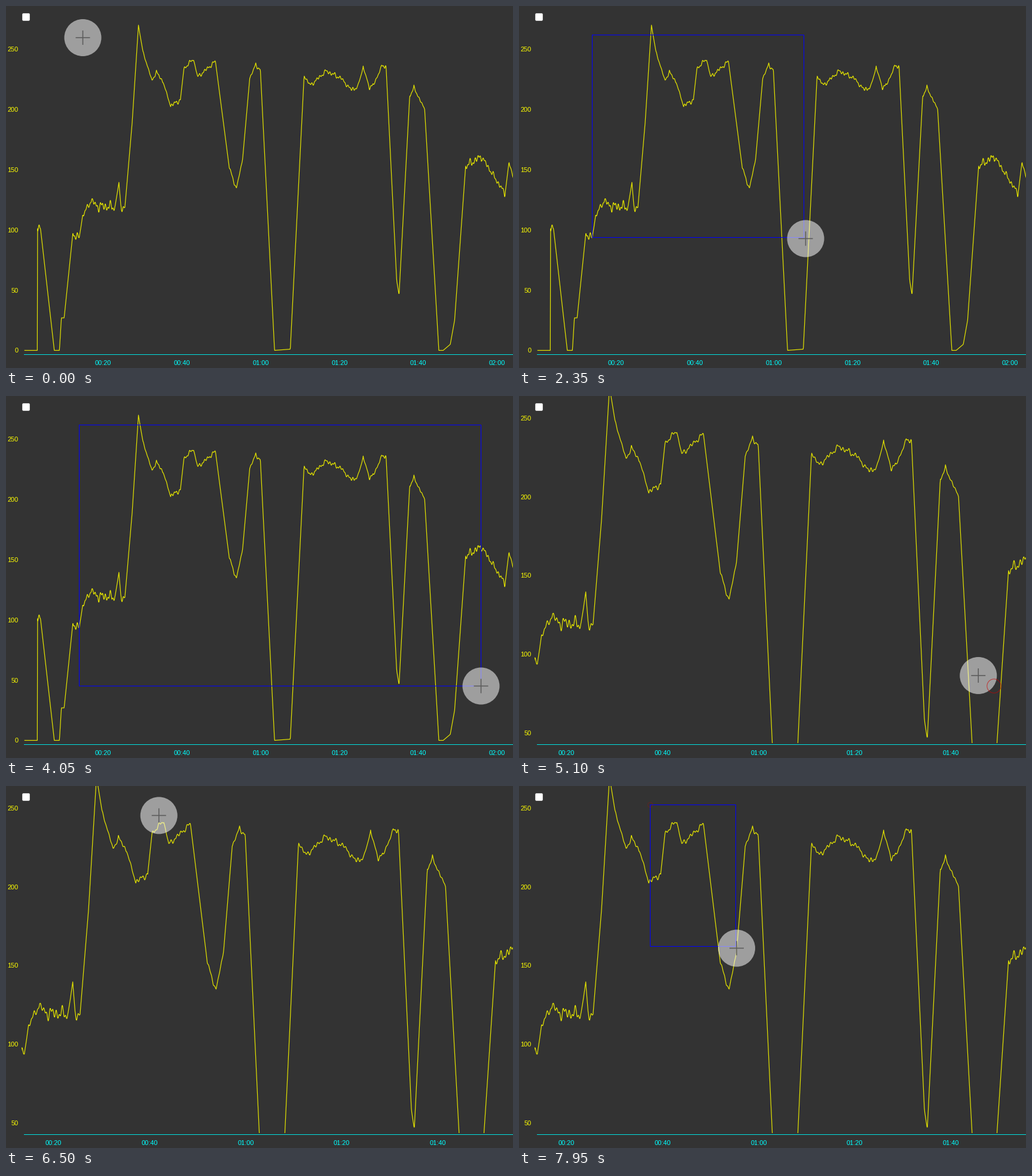
A matplotlib script for the animation above (8000 ms loop, 848x606 px).

```python
import numpy as np
import matplotlib.pyplot as plt
from matplotlib.animation import FuncAnimation
from matplotlib.patches import Circle, FancyBboxPatch, Rectangle

W, H, DPI = 848, 606, 100
STEP, LOOP = 50, 8000
PX = 72 / DPI                      # one pixel in points

BG, YELLOW, CYAN, BLUE = "#333333", "#ffff00", "#00ffff", "#0000ff"
plt.rcParams["path.snap"] = False

# Turning points of the signal: seconds, value
TURNS = np.array([
    (0, 0), (3.3, 0), (3.32, 101), (4.1, 101), (7.6, 0), (8.9, 0),
    (9.4, 27), (10.1, 27), (12.3, 97), (13.9, 93), (14.8, 112), (17.1, 125),
    (18.2, 120), (23, 119), (24, 139), (24.5, 120), (25.5, 118),
    (27.3, 186), (28.95, 270), (30.1, 248), (32.4, 224), (33.5, 231),
    (35.2, 223), (37.1, 203), (39.6, 208), (40.5, 234), (42.9, 242),
    (44, 227), (48.5, 240), (52, 152), (53.8, 134), (55.4, 159),
    (57.2, 226), (58.7, 237), (59.9, 233), (63.5, 0), (67.5, 1),
    (71, 228), (72.6, 220), (76.6, 232), (80.4, 226), (82.7, 217),
    (84.5, 218), (86, 235), (87.5, 219), (88.6, 220), (90.7, 236),
    (91.8, 236), (94.5, 58), (95.1, 46), (97.8, 211), (98.9, 218),
    (101.6, 200), (105.2, 0), (106.3, 0), (108.1, 5), (109.2, 25),
    (112, 153), (116, 161), (122, 130), (123, 156), (124.3, 141),
])


def make_signal():
    """Turning points joined by lines, with a ripple on the level parts."""
    t = np.arange(0, 124.4, 0.08)
    base = np.interp(t, *TURNS.T)
    ripple = sum(np.sin(t * f + f) for f in (3.1, 5.3, 9.7)) / 3
    slope = np.abs(np.gradient(base, t))
    rough = np.where(base < 180, 5.5, 3) * np.exp(-slope / 9)
    return t, base + ripple * rough * (base > 85)


seconds, values = make_signal()

# x of 00:00, px per second, y of zero, px per unit
OVERVIEW = (30.7, 6.59, 576.5, 2.016)
ZOOMED = (-81.2, 8.035, 695.3, 2.633)

# Pointer path: ms, x, y
PATH = np.array([
    (0, 128.5, 53), (900, 128.5, 53), (1100, 122.5, 48.5),
    (1500, 122.5, 48.5), (1850, 229.5, 182.5), (2250, 433, 364),
    (2850, 683.5, 473.5), (3200, 759, 485.5), (3900, 759, 485.5),
    (4050, 794.5, 485.5), (5000, 794.5, 485.5), (5850, 108.5, 27.5),
    (6050, 111.5, 29), (6450, 257, 50), (6900, 219.5, 31.5),
    (7200, 219.5, 31.5), (7350, 219.5, 47.5), (7950, 364, 271.5),
])
TIMES, SPOTS = PATH[:, 0], PATH[:, 1:]

# Press and release times of the two selections
PRESS, RELEASE, PRESS_AGAIN = 1500, 4700, 7200
DRAGS = [(PRESS, RELEASE), (PRESS_AGAIN, LOOP)]
RING_MS = 800


def tangents():
    """Monotone tangents: zero at holds and turns."""
    d = np.diff(SPOTS, axis=0) / np.diff(TIMES)[:, None]
    a, b = d[:-1], d[1:]
    same = a * b > 0
    mid = np.where(same, 2 * a * b / np.where(same, a + b, 1), 0)
    return np.vstack([[0, 0], mid, d[-1]])


SPEEDS = tangents()


def pointer(t):
    i = min(np.searchsorted(TIMES, t, side="right"), len(TIMES) - 1) - 1
    h = TIMES[i + 1] - TIMES[i]
    u = (t - TIMES[i]) / h
    ease = u * u * (3 - 2 * u)
    return (SPOTS[i] * (1 - ease) + SPOTS[i + 1] * ease
            + h * u * (1 - u) * (SPEEDS[i] * (1 - u) - SPEEDS[i + 1] * u))


fig = plt.figure(figsize=(W / DPI, H / DPI), dpi=DPI, facecolor=BG)
ax = fig.add_axes([0, 0, 1, 1])
ax.set_xlim(0, W)
ax.set_ylim(H, 0)
ax.axis("off")


def line(color, width, z):
    return ax.plot([], [], color=color, lw=width * PX, zorder=z,
                   solid_capstyle="butt", solid_joinstyle="round")[0]


def label(text, color, align):
    return ax.text(0, 0, text, color=color, ha=align, va="baseline",
                   family="Liberation Sans", fontsize=11 * PX, zorder=2)


curve = line("#e4e400", 1.2, 3)
curve.set_clip_path(Rectangle((26, 0), W - 26, 581, transform=ax.transData))
line("#00e0e0", 1, 2).set_data([30, W], [583.5, 583.5])
y_labels = [(v, label(str(v), YELLOW, "right")) for v in range(0, 251, 50)]
x_labels = [(s, label(f"{s // 60:02d}:{s % 60:02d}", CYAN, "center"))
            for s in range(20, 121, 20)]

ax.add_patch(FancyBboxPatch((29.5, 14.5), 8, 8, boxstyle="round,pad=2,rounding_size=2",
                            fc="white", ec="#d0d0d0", lw=PX, zorder=4))
band = ax.add_patch(Rectangle((0, 0), 1, 1, fc="none", ec=BLUE, lw=PX, zorder=5))
disc = ax.add_patch(Circle((0, 0), 31, fc=(1, 1, 1, 0.53), ec="none", zorder=6))
cross = [line("#5c5c5c", 1.6, 7) for _ in range(2)]
ring = ax.add_patch(Circle((0, 0), 1, fc="none", ec="#d00000", lw=1.1 * PX, zorder=8))


def show_view(x0, sx, y0, sy):
    curve.set_data(x0 + seconds * sx, y0 - values * sy)
    for v, text in y_labels:
        y = y0 - v * sy
        text.set_position((20.5, y + 4))
        text.set_visible(y < 583)
    for s, text in x_labels:
        x = x0 + s * sx
        text.set_position((x, 601))
        text.set_visible(x < W)


def show_band(t):
    band.set_visible(False)
    for start, end in DRAGS:
        if start < t < end:
            corner = pointer(start)
            far = np.floor(pointer(t - 7)) + 0.5   # the band trails slightly
            band.set_bounds(*corner, *(far - corner))
            band.set_visible(True)


def show_ring(t):
    """Rings close in on a press and open out on a release."""
    ring.set_visible(False)
    for start in (PRESS, RELEASE, PRESS_AGAIN):
        dt = t - start
        if 0 <= dt < RING_MS:
            ring.center = pointer(start)
            spread = dt if start == RELEASE else RING_MS - dt
            ring.set_radius(3 + 0.0217 * spread)
            ring.set_alpha(1 - dt / 1000)
            ring.set_visible(True)


def draw(i):
    t = i * STEP
    show_view(*(OVERVIEW if t < RELEASE else ZOOMED))
    show_band(t)
    show_ring(t)
    x, y = disc.center = pointer(t)
    cross[0].set_data([x - 12, x + 12], [y, y])
    cross[1].set_data([x, x], [y - 12, y + 12])
    return []


anim = FuncAnimation(fig, draw, frames=LOOP // STEP, interval=STEP,
                     repeat=True, repeat_delay=0, blit=False)
plt.show()
```
